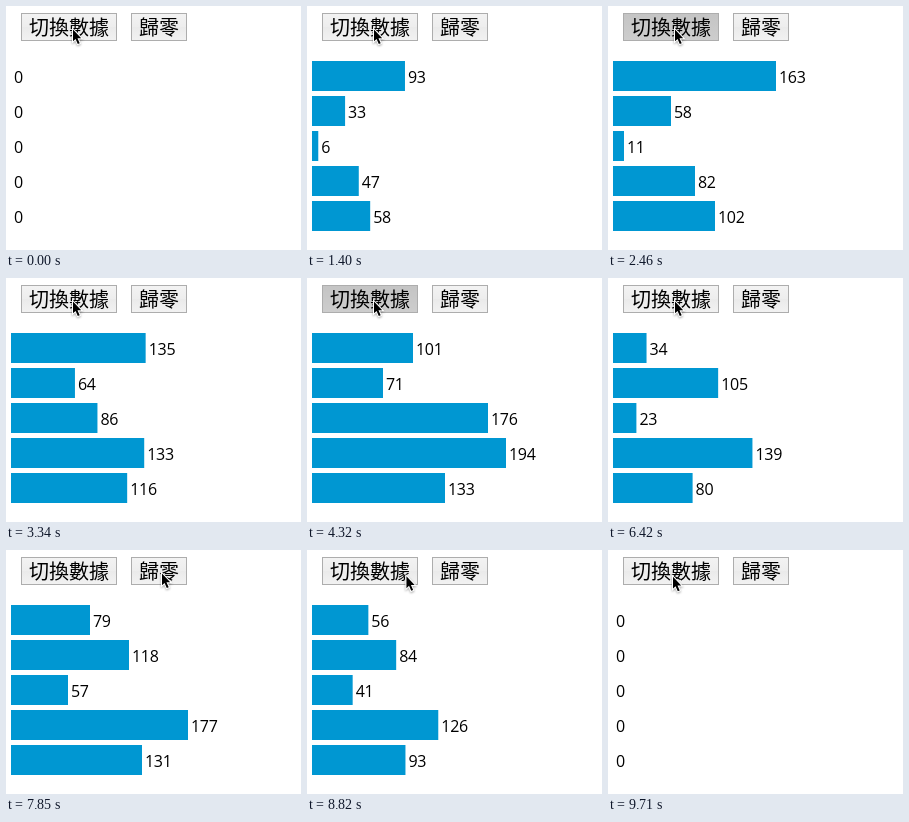
Write an HTML page that moves like this. It is 295x244 px and loops after 9.8 s.

```html
<!DOCTYPE html>
<html lang="zh-Hant">
<head>
<meta charset="utf-8">
<title>長條圖</title>
<style>
  html, body { margin: 0; width: 100%; height: 100%; overflow: hidden; background: #fff; }
  svg { display: block; width: 295px; height: 244px; }
  .label { font: 350 20px "Noto Sans CJK TC", "Noto Sans CJK JP", "Noto Sans CJK", sans-serif; text-anchor: middle; }
  .value { font: 16px "Open Sans", "Noto Sans", sans-serif; letter-spacing: -.28px; }
  #cursor { filter: drop-shadow(0 1px 1px rgba(0, 0, 0, .35)); }
</style>
</head>
<body>
<svg id="stage" viewBox="0 0 295 244" xmlns="http://www.w3.org/2000/svg">
  <defs>
    <linearGradient id="up" x2="0" y2="1">
      <stop stop-color="#f3f3f3"/><stop offset=".5" stop-color="#ededed"/>
      <stop offset=".5" stop-color="#eaeaea"/><stop offset="1" stop-color="#f2f2f2"/>
    </linearGradient>
    <linearGradient id="down" x2="0" y2="1">
      <stop stop-color="#c4c4c4"/><stop offset="1" stop-color="#cdcdcd"/>
    </linearGradient>
  </defs>
  <g stroke="#adadad">
    <rect id="swap" x="15.5" y="7.5" width="95" height="27"/>
    <rect id="reset" x="125.5" y="7.5" width="55" height="27"/>
  </g>
  <text class="label" x="63" y="29">切換數據</text>
  <text class="label" x="153" y="29">歸零</text>
  <g id="chart"></g>
  <path id="cursor" d="M0 0V11.8L2.6 9.4L4.8 14.5L6.7 13.7L4.5 8.7H8.2Z"
        fill="#000" stroke="#fff" stroke-width="2" paint-order="stroke"/>
</svg>
<script>
const LOOP = 9800, DURATION = 1500, LEFT = 5;
const ZERO = [0, 0, 0, 0, 0];

// Each change of data: button held from press to release, bars start at `start`
const rounds = [
  { press: 450,  release: 710,  start: 614,  data: [163, 58, 11, 82, 102] },
  { press: 2460, release: 2630, start: 2613, data: [101, 71, 176, 194, 133] },
  { press: 4320, release: 4500, start: 4419, data: [33, 105, 23, 139, 79] },
  { press: 6160, release: 6250, start: 6207, data: [79, 118, 57, 177, 131] },
  { press: 8120, release: 8210, start: 8198, data: ZERO, reset: true }
];

// Pointer moves: begin, end, x, y
const home = [67, 23.5];
const moves = [
  [7300, 7850, 156, 23.5],
  [8450, 9080, 66.5, 28],
  [9170, 9600, 65, 26.8]
];

const $ = id => document.getElementById(id);
const clamp = v => Math.min(1, Math.max(0, v));
const lerp = (a, b, k) => a + (b - a) * k;
const cubic = t => t < .5 ? 4 * t ** 3 : 1 - 4 * (1 - t) ** 3;
const smooth = t => t * t * (3 - 2 * t);

function add(tag, attrs) {
  const el = document.createElementNS("http://www.w3.org/2000/svg", tag);
  for (const k in attrs) el.setAttribute(k, attrs[k]);
  return $("chart").appendChild(el);
}

const rows = ZERO.map((_, i) => ({
  bar: add("rect", { x: LEFT, y: 55 + 35 * i, height: 30, fill: "#0097d2" }),
  text: add("text", { class: "value", y: 77 + 35 * i })
}));

function valuesAt(t) {
  let values = ZERO;
  for (const r of rounds) {
    const k = cubic(clamp((t - r.start) / DURATION));
    values = values.map((v, i) => lerp(v, r.data[i], k));
  }
  return values;
}

function pointerAt(t) {
  let [x, y] = home;
  for (const [begin, end, toX, toY] of moves) {
    const k = smooth(clamp((t - begin) / (end - begin)));
    x = lerp(x, toX, k);
    y = lerp(y, toY, k);
  }
  return [x, y];
}

function draw(t) {
  const held = rounds.find(r => t >= r.press && t < r.release);
  $("swap").setAttribute("fill", held && !held.reset ? "url(#down)" : "url(#up)");
  $("reset").setAttribute("fill", held && held.reset ? "url(#down)" : "url(#up)");

  valuesAt(t).forEach((v, i) => {
    const { bar, text } = rows[i];
    bar.setAttribute("width", v);
    text.setAttribute("x", LEFT + v + 3);
    text.textContent = Math.round(v);
  });

  $("cursor").setAttribute("transform", `translate(${pointerAt(t)})`);
}

const began = performance.now();
function tick() {
  draw((performance.now() - began) % LOOP);
  requestAnimationFrame(tick);
}
tick();
</script>
</body>
</html>
```
